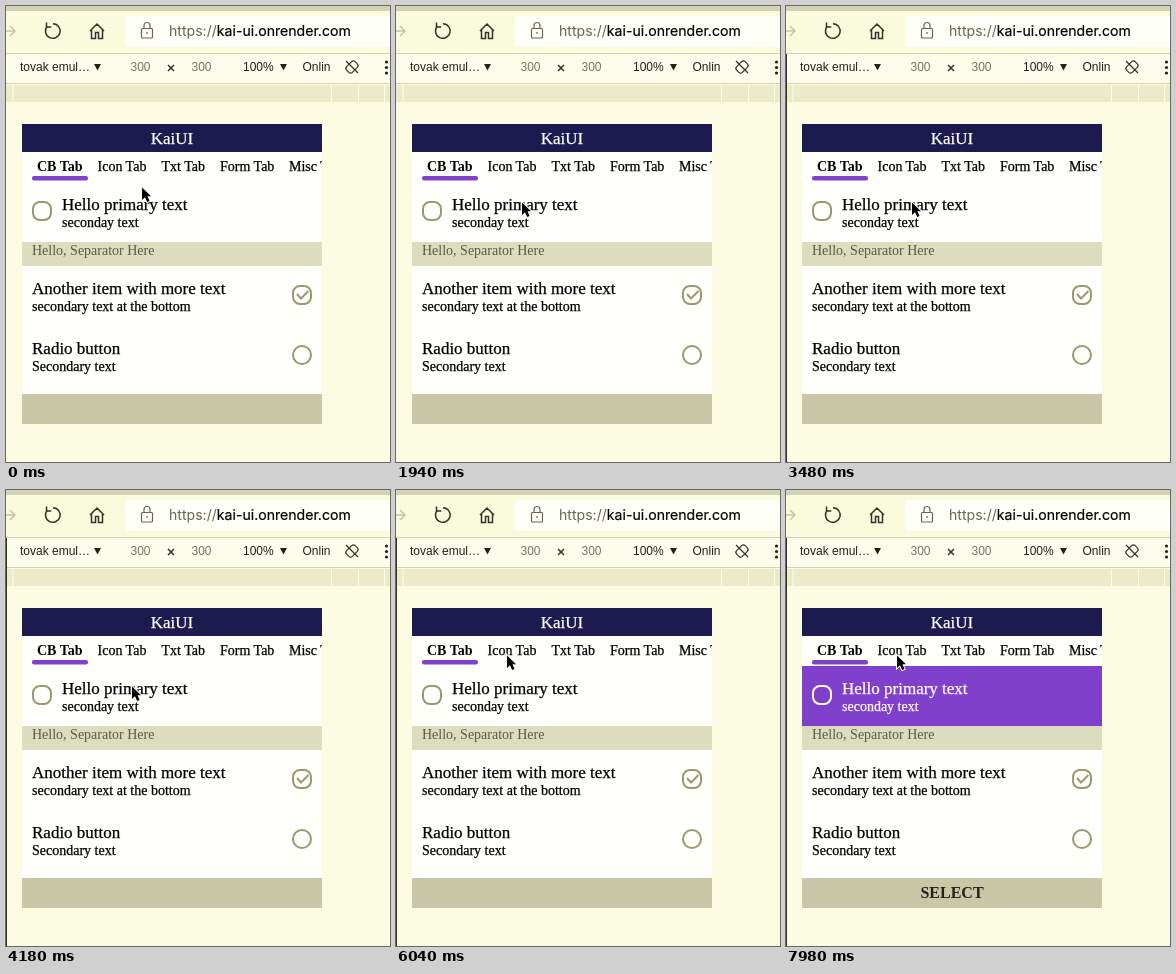
An HTML page that plays this animation: 384x456 px, repeating every 8 s.

```html
<!DOCTYPE html>
<html lang="en">
<head>
<meta charset="utf-8">
<title>Tab list demo</title>
<style>
html, body { margin: 0; width: 100%; height: 100%; overflow: hidden; background: #fcfce3; }
svg { display: block; width: 384px; height: 456px; }
text { white-space: pre; }
.bar { font: 12px "Liberation Sans", Arial, sans-serif; fill: #22221c; }
.dim { fill: #77775f; }
.url { font: 14.1px Inter, sans-serif; fill: #000; stroke: #000; stroke-width: .2; }
.app { font-family: "Liberation Serif", "Times New Roman", serif; fill: #000; }
.app text { stroke: #000; stroke-width: .25; }
.app .plain { stroke: none; }
.big { font-size: 17px; }
.small { font-size: 14px; }
.bold { font-weight: bold; }
.mid { text-anchor: middle; }
.icon { fill: none; stroke: #33332a; stroke-width: 1.5; }
.control { fill: none; stroke: #99996f; stroke-width: 2; }
.app .selected text { fill: #fff; stroke: #fff; }
.selected .control { stroke: #fff; }
</style>
</head>
<body>
<svg viewBox="0 0 384 456">
  <clipPath id="screen"><rect x="16" y="118" width="300" height="300"/></clipPath>
  <rect width="384" height="456" fill="#fcfce3"/>

  <!-- Address row -->
  <rect width="384" height="5" fill="#d2d2b4"/>
  <rect y="5" width="384" height="42" fill="#fafadd"/>
  <rect x="119" y="10" width="275" height="31" rx="4" fill="#fffffa"/>
  <path class="icon" d="M0 25H9M4 20l5 5-5 5" style="stroke:#c5c5a8"/>
  <path class="icon" d="M41.5 20A7.3 7.3 0 1 0 47 17.7M40.5 16.5v4.5h4.8"/>
  <path class="icon" d="M84 25l7-7 7 7M85.5 24v8.5h4v-6h3v6h4V24"/>
  <g class="icon" style="stroke:#66664f; stroke-width:1.2">
    <rect x="135.5" y="22.5" width="11" height="9.5" rx="1"/>
    <path d="M138 22v-2.500a3 3 0 0 1 6 0v2.500M141 26v2"/>
  </g>
  <text class="url" x="163" y="30"><tspan fill="#66664f" stroke="none">https://</tspan>kai-ui.onrender.com</text>

  <!-- Device toolbar -->
  <rect y="47" width="384" height="31" fill="#fdfdec"/>
  <path d="M0 47.500H384M0 77.500H384" stroke="#d2d2b4"/>
  <g class="bar">
    <text x="14" y="65">tovak emul…</text>
    <path d="M88 58h7l-3.500 6.500z"/>
    <text class="dim" x="124.500" y="65">300</text>
    <path class="icon" d="M162 59l6 6m0-6l-6 6"/>
    <text class="dim" x="185.500" y="65">300</text>
    <text x="237" y="65">100%</text>
    <path d="M274 58h7l-3.500 6.500z"/>
    <text x="296.500" y="65">Onlin</text>
    <g class="icon" style="stroke-width:1.2">
      <rect x="342" y="55" width="8" height="12" rx="2.500" transform="rotate(45 346 61)"/>
      <path d="M340 55l12 12"/>
    </g>
    <circle cx="380.500" cy="56" r="1.600"/><circle cx="380.500" cy="61.500" r="1.600"/><circle cx="380.500" cy="67" r="1.600"/>
  </g>
  <rect y="79" width="384" height="17" fill="#ebebca"/>
  <path d="M7 79v17M325.500 79v17M352.500 79v17M378.500 79v17" stroke="#fdfdec"/>
  <rect id="edge" y="48" width="1" height="408" fill="#33332a"/>

  <!-- App screen -->
  <g class="app" clip-path="url(#screen)">
    <rect x="16" y="118" width="300" height="300" fill="#fffffc"/>
    <rect x="16" y="118" width="300" height="28" fill="#1d1a50"/>
    <text class="big mid" x="166" y="138" style="fill:#fff; stroke:#fff">KaiUI</text>
    <g class="small">
      <text class="bold plain" x="31" y="165">CB Tab</text>
      <text x="91.500" y="165">Icon Tab</text>
      <text x="155.500" y="165">Txt Tab</text>
      <text x="214" y="165">Form Tab</text>
      <text x="283" y="165">Misc Tab</text>
    </g>
    <rect x="26" y="170" width="56" height="4.500" rx="2" fill="#8140cc"/>

    <g id="firstRow">
      <rect id="highlight" x="16" y="176" width="300" height="60" fill="#8140cc"/>
      <rect class="control" x="27" y="196" width="18" height="18" rx="7"/>
      <text class="big" x="56" y="204">Hello primary text</text>
      <text class="small" x="56" y="221">seconday text</text>
    </g>

    <rect x="16" y="236" width="300" height="24" fill="#dcdcbe"/>
    <text class="small plain" x="26" y="249" style="fill:#5a5a45">Hello, Separator Here</text>

    <text class="big" x="26" y="288">Another item with more text</text>
    <text class="small" x="26" y="305">secondary text at the bottom</text>
    <rect class="control" x="287" y="280" width="18" height="18" rx="7"/>
    <path class="control" d="M291 288l4 4.500 7.500-7.500"/>

    <text class="big" x="26" y="348">Radio button</text>
    <text class="small" x="26" y="365">Secondary text</text>
    <circle class="control" cx="296" cy="349" r="9"/>

    <rect x="16" y="388" width="300" height="30" fill="#c8c8a8"/>
    <text id="softKey" class="bold plain mid" x="166" y="408" font-size="16" style="fill:#22221a">SELECT</text>
  </g>

  <path id="cursor" d="M0 1.500V14L3 11.300 5.200 16 7.500 15 5.500 10.300H9Z"
        fill="#000" stroke="#fff" stroke-width="2" paint-order="stroke"/>
</svg>
<script>
const LOOP = 8000, EDGE_AT = 3340, SELECT_AT = 6300;
// time in ms, x, y
const cursorPath = [
  [0, 136, 180], [840, 124, 184], [1140, 124, 187],
  [1500, 126, 195], [5100, 126, 195], [5740, 111, 164], [LOOP, 111, 164]
];
const [edge, firstRow, highlight, softKey, cursor] =
  ["edge", "firstRow", "highlight", "softKey", "cursor"].map(id => document.getElementById(id));
const smooth = p => p * p * (3 - 2 * p);
const show = (element, visible) => element.setAttribute("visibility", visible ? "visible" : "hidden");

function cursorAt(time) {
  const next = cursorPath.findIndex(([start]) => start > time);
  const [t0, x0, y0] = cursorPath[next - 1];
  const [t1, x1, y1] = cursorPath[next];
  const p = smooth((time - t0) / (t1 - t0));
  return [x0 + (x1 - x0) * p, y0 + (y1 - y0) * p].map(Math.round);
}

function draw(now) {
  const time = Math.max(0, now) % LOOP;
  const selected = time >= SELECT_AT;
  cursor.setAttribute("transform", `translate(${cursorAt(time)})`);
  show(edge, time >= EDGE_AT);
  show(highlight, selected);
  show(softKey, selected);
  firstRow.setAttribute("class", selected ? "selected" : "");
}

const start = performance.now();
function tick() {
  draw(performance.now() - start);
  requestAnimationFrame(tick);
}
tick();
</script>
</body>
</html>
```
